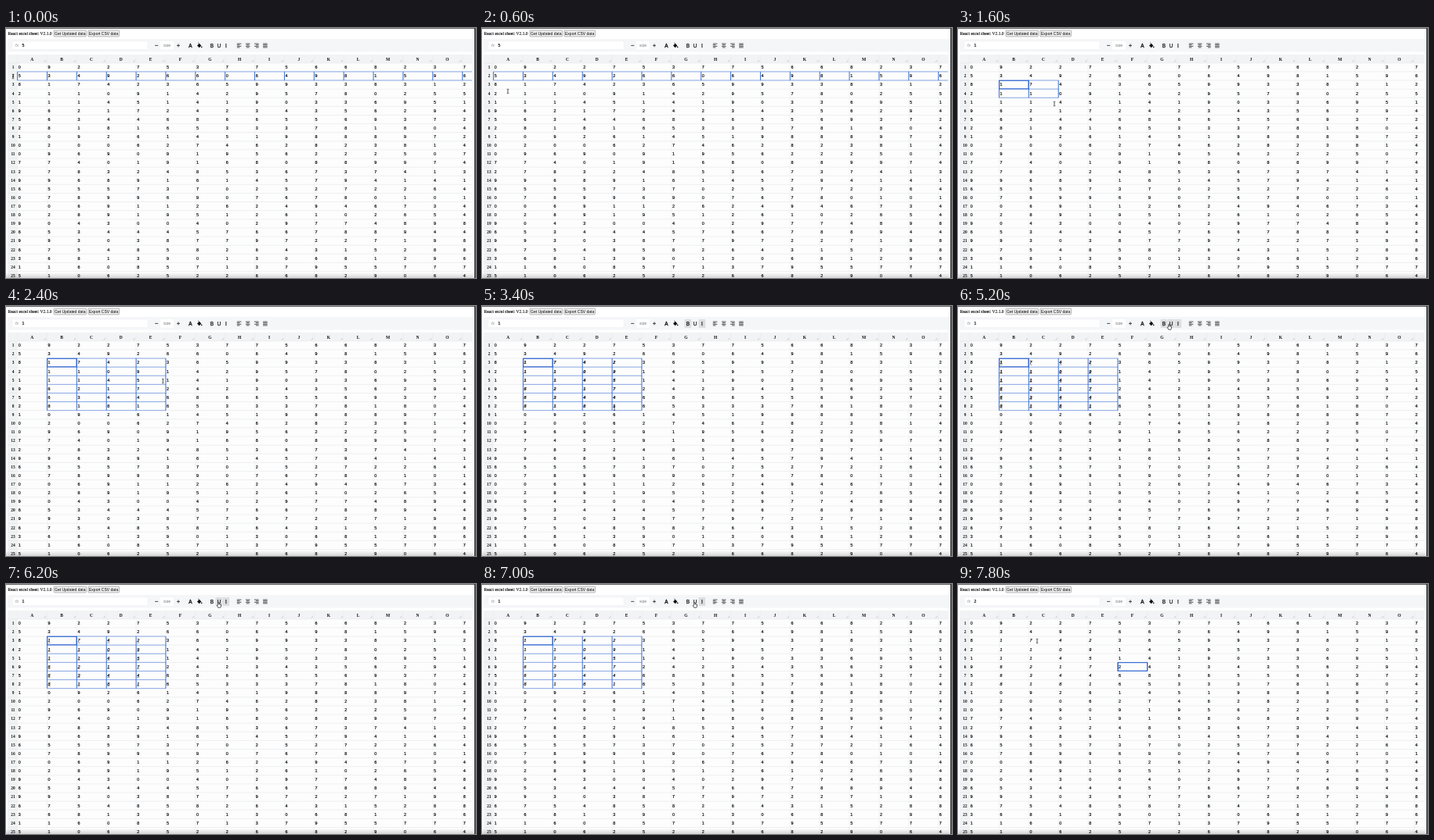
Animation of 600 by 320 pixels, one loop 8 s. Source, as an HTML page with a canvas:

```html
<!DOCTYPE html>
<html lang="en">
<head>
<meta charset="utf-8">
<title>Spreadsheet</title>
<style>
html, body { margin: 0; width: 100%; height: 100%; overflow: hidden; background: #fff; }
canvas { display: block; width: 600px; height: 320px; }
</style>
</head>
<body>
<canvas id="stage"></canvas>
<script>
const canvas = document.getElementById('stage');
const ctx = canvas.getContext('2d');
const ratio = window.devicePixelRatio || 1;
canvas.width = 600 * ratio;
canvas.height = 320 * ratio;

const LOOP = 8000, STEP = 200;
const ROWS = 25, COLS = 16;
const LEFT = 14.6, COL = 37.87, TOP = 44.8, ROW = 11.11, RIGHT = 595;
const SANS = '"Liberation Sans", Arial, sans-serif';
const SERIF = '"Liberation Serif", "Times New Roman", serif';
const BLUE = '#2b62cf', PALE_BLUE = '#6f97e2';

// The cells being edited have fixed values, the rest are seeded random digits
const edited = ['534926', '817423', '211091', '111451', '962172', '563446', '281816'];
let seed = 7;
const randomDigit = () => {
  seed = (seed * 16807) % 2147483647;
  return Math.floor(seed / 2147483647 * 10);
};
const cells = Array.from({ length: ROWS }, (_, r) =>
  Array.from({ length: COLS }, (_, c) => edited[r - 1]?.[c] ?? randomDigit()));

// Cursor stops: time, x, y
const stops = [
  [0, 9, 62], [600, 33, 81], [1200, 45, 75], [1600, 123, 97], [2000, 169, 131],
  [2200, 169, 131], [2800, 263, 26], [3000, 281, 26], [3400, 169, 131], [4000, 387, 46],
  [4800, 270, 27], [5200, 270, 27], [5600, 264, 26], [6200, 272, 27], [7000, 272, 27],
  [7400, 222, 105], [7800, 101, 73]
];

const colX = c => LEFT + c * COL;
const rowY = r => TOP + r * ROW;
const within = (t, from, to) => t >= from && t < to;

function rect(x, y, w, h, color) {
  ctx.fillStyle = color;
  ctx.fillRect(x, y, w, h);
}

function line(x1, y1, x2, y2, color, width) {
  ctx.strokeStyle = color;
  ctx.lineWidth = width;
  ctx.beginPath();
  ctx.moveTo(x1, y1);
  ctx.lineTo(x2, y2);
  ctx.stroke();
}

function box(x, y, w, h, radius, fill, stroke) {
  ctx.beginPath();
  ctx.roundRect(x, y, w, h, radius);
  ctx.fillStyle = fill;
  ctx.fill();
  if (!stroke) return;
  ctx.strokeStyle = stroke;
  ctx.lineWidth = 0.5;
  ctx.stroke();
}

function text(str, x, y, font, color = '#111', align = 'left', weight = 0) {
  ctx.font = font;
  ctx.fillStyle = color;
  ctx.textAlign = align;
  ctx.fillText(str, x, y);
  if (!weight) return;
  ctx.strokeStyle = color;
  ctx.lineWidth = weight;
  ctx.strokeText(str, x, y);
}

function cursorAt(t) {
  const i = stops.findIndex(s => s[0] > t);
  if (i < 0) return stops[stops.length - 1].slice(1);
  const [t1, x1, y1] = stops[i - 1], [t2, x2, y2] = stops[i];
  const k = (t - t1) / (t2 - t1);
  return [x1 + (x2 - x1) * k, y1 + (y2 - y1) * k];
}

function selectionAt(t) {
  if (t < 1200) return { c1: 0, r1: 1, c2: COLS - 1, r2: 1 };
  if (t < 1400) return { c1: 0, r1: 2, c2: 0, r2: 2 };
  if (t >= 7400) return { c1: 5, r1: 5, c2: 5, r2: 5 };
  const drag = Math.min((t - 1400) / 600, 1);
  return { c1: 1, r1: 2, c2: 1 + Math.round(3 * drag), r2: 2 + Math.floor(5 * drag) };
}

function drawHead() {
  text('React excel sheet: V2.1.0', 2.5, 9, `5.5px ${SERIF}`, '#000', 'left', 0.1);
  [[61, 41.5, 'Get Updated data'], [104.8, 39.7, 'Export CSV data']].forEach(([x, w, label]) => {
    box(x, 3, w, 8, 1.2, '#efefef', '#777');
    text(label, x + w / 2, 8.8, `5px ${SANS}`, '#000', 'center');
  });
}

function drawBucket() {
  ctx.fillStyle = '#111';
  ctx.beginPath();
  ctx.moveTo(244, 22.6);
  ctx.lineTo(246.7, 19.8);
  ctx.lineTo(249.4, 22.6);
  ctx.lineTo(246.7, 25.2);
  ctx.fill();
  line(245.2, 18.8, 247, 20.6, '#111', 0.7);
  ctx.beginPath();
  ctx.arc(249.7, 24.4, 0.8, 0, 7);
  ctx.fill();
}

function drawAlignIcon(kind) {
  const x = 294.8 + kind * 11.1;
  for (let i = 0; i < 4; i++) {
    const w = kind < 3 && i % 2 ? 3.6 : 5.6;
    const start = x + (5.6 - w) * kind / 2;
    line(start, 20.1 + i * 1.6, start + w, 20.1 + i * 1.6, '#222', 0.75);
  }
}

function drawToolbar(value, active) {
  rect(2, 14, 594, 16.5, '#f5f6f8');
  box(8, 17, 173, 10.5, 1, '#fff', '#eceef0');
  text('fx', 12, 24.2, `italic 5px ${SANS}`, '#888');
  text(value, 20.5, 24.2, `5.2px ${SANS}`, '#111', 'left', 0.2);
  box(197, 17, 17, 10.5, 1, '#fff');
  text('size', 205.5, 24.1, `5.2px ${SANS}`, '#777', 'center');
  line(190.2, 22.4, 194.2, 22.4, '#222', 0.8);
  line(218, 22.4, 222, 22.4, '#222', 0.8);
  line(220, 20.4, 220, 24.4, '#222', 0.8);
  text('A', 235.5, 24.7, `6.4px ${SANS}`, '#111', 'center', 0.35);
  drawBucket();
  ['B', 'U', 'I'].forEach((name, i) => {
    const x = 263 + i * 9;
    if (active[name]) box(x - 4.4, 17, 8.6, 11, 0.8, '#dcdee1');
    text(name, x, 24.7, `6.4px ${SANS}`, '#111', 'center', 0.25);
  });
  for (let kind = 0; kind < 4; kind++) drawAlignIcon(kind);
}

function drawGrid() {
  rect(2, 33.8, RIGHT - 2, TOP - 33.8, '#f2f3f5');
  rect(2, TOP, LEFT - 2, 320 - TOP, '#f2f3f5');
  rect(LEFT, TOP, RIGHT - LEFT, 320 - TOP, '#fdfdfd');
  for (let r = 0; r <= ROWS; r++) line(2, rowY(r), RIGHT, rowY(r), '#dfe1e4', 0.5);
  for (let c = 0; c < COLS; c++) {
    line(colX(c), 33.8, colX(c), 320, '#e6e8ea', 0.5);
    if (c === COLS - 1) continue;
    text(String.fromCharCode(65 + c), colX(c) + COL / 2 - 0.4, 41.5, `bold 5.5px ${SERIF}`, '#111', 'center');
    const x = colX(c + 1) - 1.5;
    line(x - 2.4, 43.4, x, 41, '#b5b8bc', 0.6);
    line(x - 1, 43.4, x, 42.4, '#b5b8bc', 0.6);
  }
}

function drawCells(bold, italic, underline) {
  cells.forEach((row, r) => {
    const base = rowY(r) + 7.4;
    text(r + 1, 9, base, `bold 5.4px ${SERIF}`, '#111', 'center');
    row.forEach((digit, c) => {
      const styled = within(c, 1, 5) && within(r, 2, 8);
      const style = styled ? `${italic ? 'italic ' : ''}${bold ? 'bold ' : ''}` : '';
      const x = colX(c) + 1.1;
      text(digit, x, base, `${style}5.4px ${SANS}`, '#111', 'left', 0.2);
      if (styled && underline) line(x, base + 0.8, x + 3, base + 0.8, '#111', 0.45);
    });
  });
}

function drawSelection({ c1, r1, c2, r2 }) {
  const right = Math.min(colX(c2 + 1), RIGHT), bottom = rowY(r2 + 1);
  for (let r = r1; r <= r2 + 1; r++) line(colX(c1), rowY(r), right, rowY(r), PALE_BLUE, 0.8);
  for (let c = c1; c <= c2 + 1 && c < COLS; c++) line(colX(c), rowY(r1), colX(c), bottom, BLUE, 0.9);
  if (c2 === COLS - 1) return;
  ctx.strokeStyle = BLUE;
  ctx.lineWidth = 1;
  ctx.strokeRect(colX(c1) + 0.3, rowY(r1) + 0.3, COL - 0.6, ROW - 0.6);
}

function drawHand(x, y) {
  ctx.save();
  ctx.translate(x, y);
  ctx.beginPath();
  ctx.moveTo(-1.3, 0);
  ctx.lineTo(-1.3, -3.2);
  ctx.quadraticCurveTo(-0.6, -4.2, 0, -3.2);
  ctx.lineTo(0, -1.2);
  ctx.lineTo(2.6, -0.6);
  ctx.lineTo(2.4, 1.8);
  ctx.lineTo(1.7, 3.2);
  ctx.lineTo(-1.2, 3.2);
  ctx.lineTo(-2.8, 0.4);
  ctx.closePath();
  ctx.fillStyle = '#fff';
  ctx.fill();
  ctx.strokeStyle = '#111';
  ctx.lineWidth = 0.7;
  ctx.stroke();
  ctx.restore();
}

function drawBeam(x, y) {
  line(x, y - 2.5, x, y + 2.5, '#222', 0.8);
  line(x - 1.3, y - 2.7, x + 1.3, y - 2.7, '#222', 0.6);
  line(x - 1.3, y + 2.7, x + 1.3, y + 2.7, '#222', 0.6);
}

function drawFrame() {
  const shade = ctx.createLinearGradient(0, 313, 0, 320);
  shade.addColorStop(0, 'rgba(0, 0, 0, 0)');
  shade.addColorStop(1, 'rgba(0, 0, 0, 0.16)');
  rect(0, 313, 600, 7, shade);
  rect(0, 0, 600, 0.7, '#222');
  rect(598, 0, 1, 320, '#16181b');
  rect(599, 0, 1, 320, '#777');
}

function draw(t) {
  const selection = selectionAt(t);
  const bold = within(t, 2800, 5600);
  const italic = t >= 3000;
  const underline = within(t, 5000, 6600);
  const [x, y] = cursorAt(t);

  ctx.setTransform(ratio, 0, 0, ratio, 0, 0);
  rect(0, 0, 600, 320, '#fff');
  drawHead();
  drawToolbar(cells[selection.r1][selection.c1], { B: bold, U: underline, I: italic && t < 7400 });
  drawGrid();
  drawCells(bold, italic, underline);
  drawSelection(selection);
  drawFrame();
  if (y < 31) drawHand(x, y);
  else drawBeam(x, y);
}

function tick() {
  const t = performance.now() % LOOP;
  draw(Math.floor(t / STEP) * STEP);
  requestAnimationFrame(tick);
}
tick();
</script>
</body>
</html>
```
